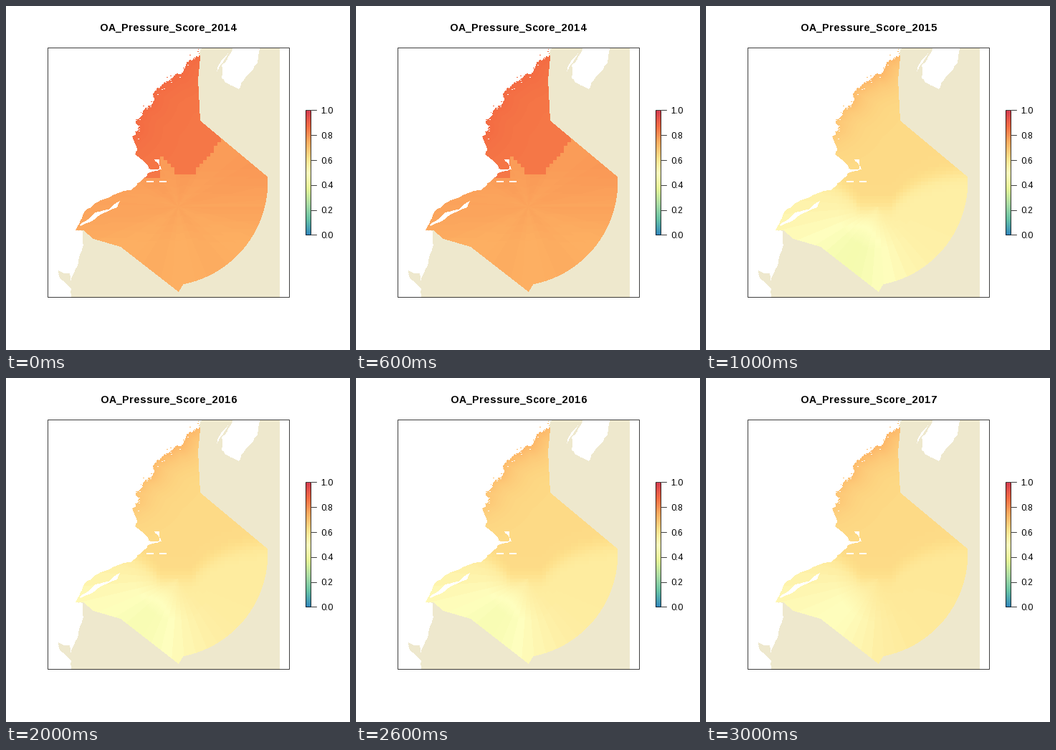
These frames come from a looping animation (480 px wide and 480 px high, 4000 ms). A matplotlib script:

```python
import numpy as np
import matplotlib.pyplot as plt
from matplotlib.animation import FuncAnimation
from matplotlib.colors import LinearSegmentedColormap
from matplotlib.patches import Rectangle
from matplotlib.path import Path

SIZE = 480
CELL = 5
BEIGE = np.array([238, 232, 205]) / 255

# Whole-pixel glyph advances
plt.rcParams.update({"font.family": "Liberation Sans", "text.hinting_factor": 1})
spectral = LinearSegmentedColormap.from_list("spectral", [
    "#3288BD", "#66C2A5", "#ABDDA4", "#E6F598", "#FFFFBF",
    "#FEE08B", "#FDAE61", "#F46D43", "#D53E4F"])

rng = np.random.default_rng(12)
X, Y = np.meshgrid(np.arange(SIZE) + 0.5, np.arange(SIZE) + 0.5)


def inside(points):
    grid = np.column_stack([X.ravel(), Y.ravel()])
    return Path(points).contains_points(grid).reshape(X.shape)


def rough(points, amount, depth=3):
    """Roughen a polyline by repeated midpoint displacement."""
    pts = np.array(points, float)
    for _ in range(depth):
        step = np.diff(pts, axis=0)
        normal = np.column_stack([-step[:, 1], step[:, 0]])
        mids = pts[:-1] + step / 2 + normal * rng.normal(0, amount, (len(step), 1))
        merged = np.empty((len(pts) + len(mids), 2))
        merged[::2], merged[1::2] = pts, mids
        pts = merged
    return pts


def make_land():
    """Return the land mask and the points of the ragged northern shore."""
    gulf_shore = rough([(271, 59), (270, 69), (248, 90), (231, 101), (218, 113),
                        (207, 131), (195, 141), (181, 160), (177, 185)], 0.17, 5)
    cape = rough([(177, 185), (182, 196), (180, 207), (190, 214), (199, 227),
                  (214, 227), (207, 214), (214, 214), (217, 228), (194, 239),
                  (175, 257)], 0.07)
    sound = rough([(175, 257), (135, 270), (109, 288), (97, 313), (107, 314),
                   (108, 334), (97, 367), (90, 384), (89, 373), (73, 369),
                   (75, 380), (91, 394), (91, 407)], 0.05)
    land = inside(np.vstack([[(0, 59)], gulf_shore, cape, sound, [(0, 407)]]))

    long_island = [(103, 305), (125, 288), (159, 272), (155, 281), (104, 307)]
    peninsula = [(317, 58), (301, 82), (301, 100), (314, 111), (325, 116),
                 (334, 100), (351, 79), (354, 58)]
    neck = [(294, 93), (300, 77), (315, 58), (303, 78)]
    for shore in (long_island, peninsula, neck):
        land |= inside(rough(shore + shore[:1], 0.05))
    for cx in (201, 219):
        land |= np.hypot((X - cx) / 5, (Y - 245) / 1.5) < 1

    for point in gulf_shore[::4]:
        col, row = (point + rng.normal(0, 3, 2)).astype(int)
        land[row, col:col + 2] = rng.random() < 0.7
    return land, gulf_shore


land, gulf_shore = make_land()
arc = np.radians(np.linspace(-2.5, 79, 60))
rim = np.column_stack([219.4 + 146 * np.cos(arc), 245 + 146 * np.sin(arc)])
study_area = np.vstack([
    [(60, 60), (269, 60), (271, 72), (268, 103), (271, 160)], rim,
    [(241, 399), (160, 336), (122, 325), (108, 313), (60, 313)]])
scored = inside(study_area) & ~land

base_map = np.ones((SIZE, SIZE, 3))
base_map[(X > 59) & (X < 382) & (Y > 59) & (Y < 407) & ~land] = BEIGE

# Fields shared by every year
offshore = np.min([np.hypot(X - x, Y - y) for x, y in gulf_shore[::6]], axis=0)
cell_x, cell_y = ((axis // CELL + 0.5) * CELL for axis in (X, Y))
radius = np.hypot(X - 240, Y - 280)
bearing = np.degrees(np.arctan2(Y - 280, X - 240)) % 360
fan = np.round(bearing / 9) * 9


def gulf_score():
    """High scores in the gulf, ending in a stepped edge."""
    edge = 236 - 1.2 * np.maximum(np.abs(cell_x - 250) - 10, 0)
    edge = np.where(cell_x < 217, 239, edge)
    north = 0.853 + 0.025 * np.exp(-offshore / 25)
    south = 0.787 - 0.04 * np.clip((Y - 225) / 110, 0, 1) + 0.004 * np.cos(fan / 9)
    return np.where(cell_y < edge, north, south)


def shelf_score(high, dip, centre, width):
    """Mild gulf scores blending into a fan that dips around one bearing."""
    edge = 280 - 50 * (1 - np.exp(-np.maximum(np.abs(cell_x - 237) - 22, 0) / 40))
    share = 1 / (1 + np.exp((cell_y - edge) / 6))
    north = 0.637 + 0.09 * np.exp(-offshore / 25) * np.clip((260 - Y) / 160, 0, 1)
    valley = np.exp(-((fan - centre) / width) ** 2)
    south = high - dip * valley * np.clip(radius / 60, 0.3, 1)
    return share * north + (1 - share) * south


def paint(score):
    image = base_map.copy()
    image[scored] = spectral(score)[..., :3][scored]
    return image


maps = [paint(score) for score in (
    gulf_score(),
    shelf_score(0.56, 0.11, 118, 45),
    shelf_score(0.575, 0.11, 128, 48),
    shelf_score(0.59, 0.085, 140, 50))]

fig = plt.figure(figsize=(SIZE / 72, SIZE / 72), dpi=72, facecolor="white")
ax = fig.add_axes([0, 0, 1, 1])
picture = ax.imshow(maps[0], extent=(0, SIZE, SIZE, 0), aspect="auto",
                    interpolation="nearest")
ax.imshow(np.linspace(1, 0, 174)[:, None], cmap=spectral, vmin=0, vmax=1,
          extent=(418, 426, 320, 146), aspect="auto", interpolation="nearest")
ax.set(xlim=(0, SIZE), ylim=(SIZE, 0))
ax.axis("off")


def outline(left, top, right, bottom):
    ax.add_patch(Rectangle((left, top), right - left, bottom - top,
                           fill=False, ec="black", lw=0.75))


outline(58.4, 58.4, 395.4, 406.4)
outline(418.4, 145.4, 425.4, 319.4)
for value in np.linspace(0, 1, 6):
    y = 319.4 - 174 * value
    ax.plot([425.5, 432.5], [y, y], color="black", lw=0.75)
    ax.text(439, y + 4.6, f"{value:.1f}", size=12, va="baseline")
title = ax.text(227.2, 35, "", size=14.4, weight="bold", ha="center", va="baseline")


def draw(index):
    picture.set_data(maps[index])
    title.set_text(f"OA_Pressure_Score_{2014 + index}")
    return picture, title


animation = FuncAnimation(fig, draw, frames=len(maps), interval=1000,
                          repeat=True, repeat_delay=0)
plt.show()
```
